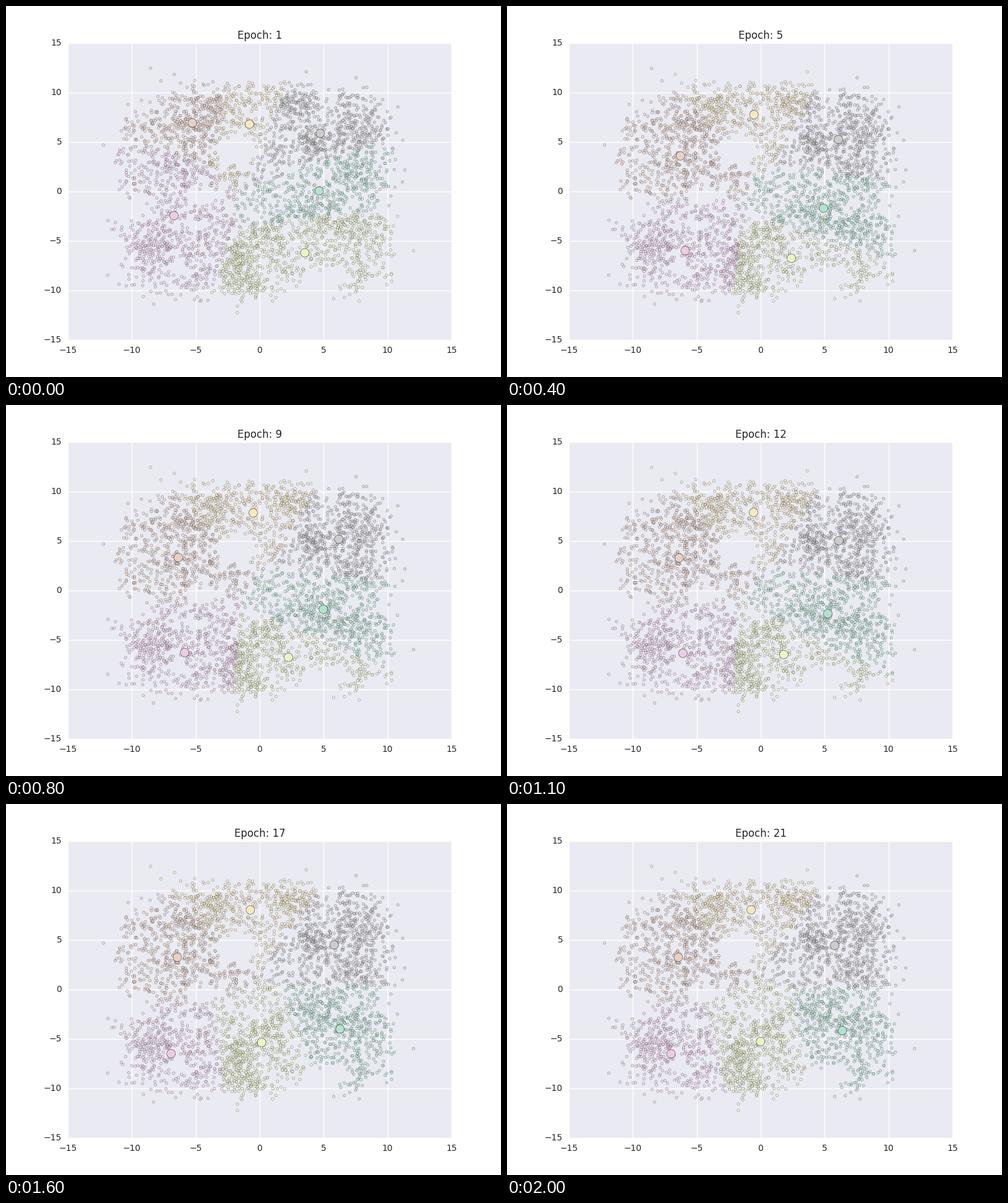
Animation, 800 px wide and 600 px high, one loop 2100 ms. Source, as a matplotlib script:

```python
import numpy as np
import matplotlib.pyplot as plt
from matplotlib.animation import FuncAnimation

EPOCHS = 21
COUNT = 3800
plt.rcParams.update({
    "font.family": "DejaVu Sans",
    "text.color": "0.15",
    "xtick.color": "0.15",
    "ytick.color": "0.15",
})

# Six samples along the blended Pastel2 palette.
pastel = plt.get_cmap("Pastel2")(np.arange(8))[:, :3]
colors = np.array([[np.interp(t, np.arange(8), ch) for ch in pastel.T]
                   for t in np.linspace(0, 7, 6)])

# Crowded spots (x, y) and gaps (x, y, radius) in the cloud.
spots = [(4.5, 4.7), (-5.9, 2.7), (-3.7, 8.4), (-5.8, 6.6), (7.5, 2.1),
         (6.8, -3.6), (4.3, -1.8), (0.6, -4.5), (-1.0, -9.3), (-8.2, -5.5),
         (7.8, 6.2), (2.7, 8.8), (-1.7, -7.0)]
gaps = [(-10.5, 10.6, 3.2), (-1.8, 4.4, 1.8), (-4.6, -0.4, 1.0),
        (-10.3, -1.8, 1.7), (5.2, -8.6, 1.5), (4.0, -11.0, 2.2),
        (11.0, -1.0, 1.5), (5.2, 11.3, 1.4), (-6.3, -7.4, 0.7)]


def density(x, y):
    """Chance of a point: a soft rounded square with spots and gaps."""
    r = (np.abs((x + 0.3) / 10.6) ** 5 + np.abs(y / 10.8) ** 5) ** 0.2
    crowd = 0.32 + sum(0.6 * np.exp(-((x - a) ** 2 + (y - b) ** 2) / 2)
                       for a, b in spots)
    crowd = crowd / (1 + np.exp((r - 0.98) / 0.035))
    for a, b, size in gaps:
        crowd *= 1 - np.exp(-(np.hypot(x - a, y - b) / size) ** 4)
    return crowd


rng = np.random.default_rng(7)
trial = rng.uniform(-12.5, 12.5, (40000, 2))
points = trial[rng.random(len(trial)) < density(*trial.T)][:COUNT]

# Centroid poses: green, tan, pink, lime, yellow, grey.
seeds = np.array([(5.3, -0.9), (-5.6, 7.9), (-8.9, 0.0),
                  (5.8, -4.0), (-0.7, 6.9), (2.2, 6.0)])
first = np.array([(4.65, 0.06), (-5.27, 6.94), (-6.70, -2.44),
                  (3.53, -6.19), (-0.80, 6.81), (4.74, 5.88)])
settled = np.array([(4.94, -1.85), (-6.37, 3.3), (-5.83, -6.3),
                    (2.3, -6.8), (-0.5, 7.85), (6.2, 5.2)])
final = np.array([(6.39, -4.16), (-6.44, 3.25), (-7.02, -6.5),
                  (-0.02, -5.25), (-0.75, 8.06), (5.79, 4.45)])


def centroids(epoch):
    """Quick settling at first, then a slow slide to the final pose."""
    if epoch < 1:
        return seeds
    settle = 1 - np.exp((1 - epoch) / 1.6)
    slide = 1 / (1 + np.exp((13.7 - epoch) / 1.3))
    return first + settle * (settled - first) + slide * (final - settled)


def labels(centers):
    gap = points[:, None] - centers
    return (gap ** 2).sum(axis=2).argmin(axis=1)


fig = plt.figure(figsize=(8, 6), dpi=100, facecolor="white")
ax = fig.add_axes([0.125, 0.1, 0.775, 0.8], facecolor="#EAEAF2")
ax.set(xlim=(-15, 15), ylim=(-15, 15),
       xticks=range(-15, 16, 5), yticks=range(-15, 16, 5))
ax.set_axisbelow(True)
ax.grid(color="white", lw=1, ls="-")
ax.tick_params(length=0, pad=7, labelsize=10)
plt.setp(ax.get_yticklabels(), va="center")
for spine in ax.spines.values():
    spine.set_visible(False)
title = ax.set_title("", fontsize=12, pad=5)

dots = ax.scatter(*points.T, s=10, c="w", edgecolors="k", linewidths=0.3,
                  alpha=0.5, zorder=2)
marks = ax.scatter(*seeds.T, s=100, c=colors, edgecolors="k",
                   linewidths=0.3, zorder=3)


def draw(i):
    epoch = i + 1
    dots.set_facecolor(colors[labels(centroids(epoch - 1))])
    marks.set_offsets(centroids(epoch))
    title.set_text(f"Epoch: {epoch}")
    return dots, marks, title


anim = FuncAnimation(fig, draw, frames=EPOCHS, interval=100,
                     repeat=True, repeat_delay=0, blit=False)
plt.show()
```
